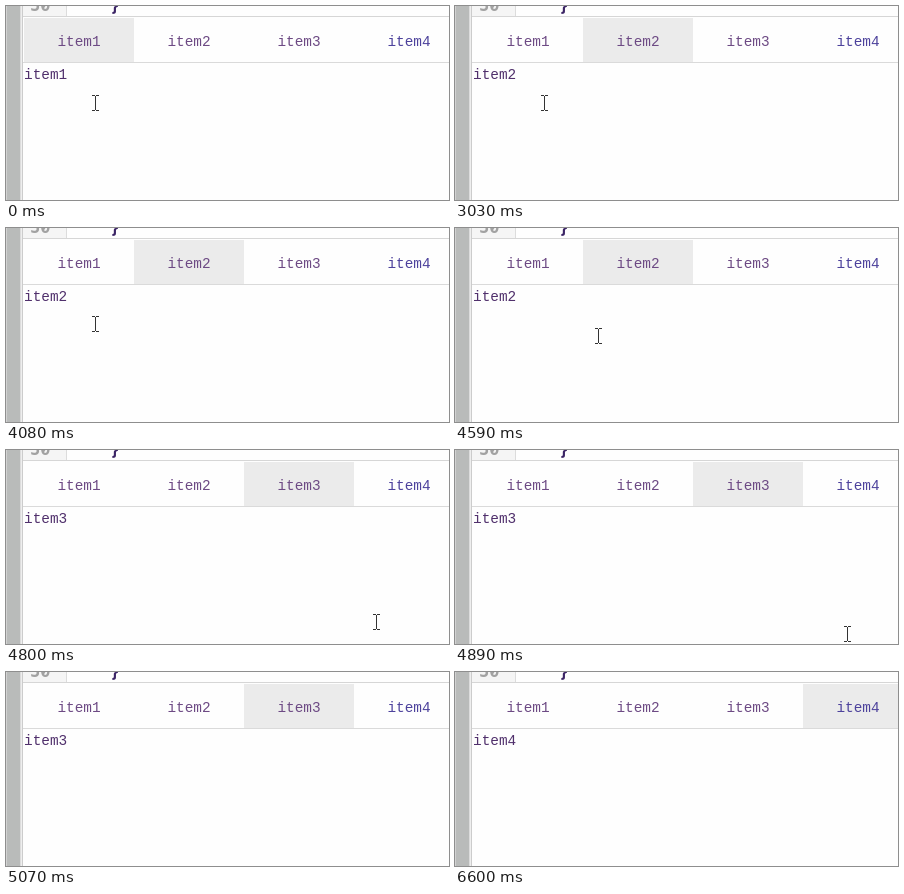
An HTML page that plays this animation: 443 px wide and 194 px high, repeating every 6.78 s.

```html
<!DOCTYPE html>
<html lang="en">
<head>
<meta charset="utf-8">
<title>Tabs</title>
<style>
  html, body { margin: 0; width: 100%; height: 100%; overflow: hidden; background: #fefefe; }
  svg { display: block; width: 443px; height: 194px; }
  text { font: 14.4px "Liberation Mono", "Noto Sans Mono", monospace; fill: #6d4a84; }
  .code { font: bold 17px "Noto Sans Mono", "DejaVu Sans Mono", monospace; }
  #tabs text:last-child { fill: #4d429c; }
</style>
</head>
<body>
<svg viewBox="0 0 443 194" shape-rendering="crispEdges">
  <rect width="443" height="194" fill="#fefefe"/>

  <!-- code editor strip -->
  <rect x="17" width="43" height="10" fill="#f5f5f5"/>
  <rect x="60" width="1" height="10" fill="#dcdcdc"/>
  <text class="code" x="24" y="5" style="fill:#a2a2a2">30</text>
  <text class="code" x="104" y="5" style="fill:#3b2465">}</text>

  <!-- tab bar -->
  <rect id="active" y="12" width="110" height="44" fill="#ebebeb"/>
  <rect x="17" y="10" width="426" height="1" fill="#d6d6d6"/>
  <rect x="17" y="56" width="426" height="1" fill="#dadada"/>
  <g id="tabs"></g>
  <text id="content" x="18" y="73" style="fill:#50306c"></text>

  <!-- window edge -->
  <rect width="17" height="194" fill="#eeeeee"/>
  <rect width="1" height="194" fill="#d2d2d2"/>
  <rect x="1" width="13" height="194" fill="#b9bbba"/>
  <rect x="14" width="1" height="194" fill="#dcdcdc"/>
  <rect x="16" width="1" height="194" fill="#cccccc"/>

  <path id="cursor" fill="#333" d="M-3-8h3v1h-3zM1-8h3v1h-3zM0-7h1v14h-1zM-3 7h3v1h-3zM1 7h3v1h-3z"/>
</svg>
<script>
const LOOP = 6780, TICK = 30, TAB_WIDTH = 110, TAB_LEFT = 18;
const tabStarts = [0, 3030, 4800, 6600];
const cursorEnd = 5070;

// time, x, y of the pointer
const path = [
  [0, 89, 97], [4050, 89, 97], [4080, 89, 96], [4500, 89, 96],
  [4530, 94, 97], [4590, 143, 108], [4650, 230, 129], [4710, 308, 149],
  [4770, 356, 164], [4800, 370, 172], [4890, 392, 184], [5070, 409, 200]
];

const $ = id => document.getElementById(id);
const active = $("active"), content = $("content"), cursor = $("cursor");

tabStarts.forEach((_, i) => {
  const label = document.createElementNS("http://www.w3.org/2000/svg", "text");
  label.setAttribute("x", TAB_LEFT + TAB_WIDTH * (i + 0.5));
  label.setAttribute("y", 40);
  label.setAttribute("text-anchor", "middle");
  label.textContent = `item${i + 1}`;
  $("tabs").append(label);
});

function pointerAt(t) {
  const next = path.findIndex(p => p[0] > t);
  const [t0, x0, y0] = path[next - 1], [t1, x1, y1] = path[next];
  const k = (t - t0) / (t1 - t0);
  return [Math.round(x0 + (x1 - x0) * k), Math.round(y0 + (y1 - y0) * k)];
}

function draw(now) {
  const t = Math.floor((now % LOOP) / TICK) * TICK;
  const tab = tabStarts.filter(start => start <= t).length - 1;
  active.setAttribute("x", TAB_LEFT + TAB_WIDTH * tab);
  content.textContent = `item${tab + 1}`;

  const visible = t < cursorEnd;
  cursor.setAttribute("visibility", visible ? "visible" : "hidden");
  if (visible) cursor.setAttribute("transform", `translate(${pointerAt(t)})`);
}

const start = performance.now();
function frame() {
  draw(performance.now() - start);
  requestAnimationFrame(frame);
}
frame();
</script>
</body>
</html>
```
